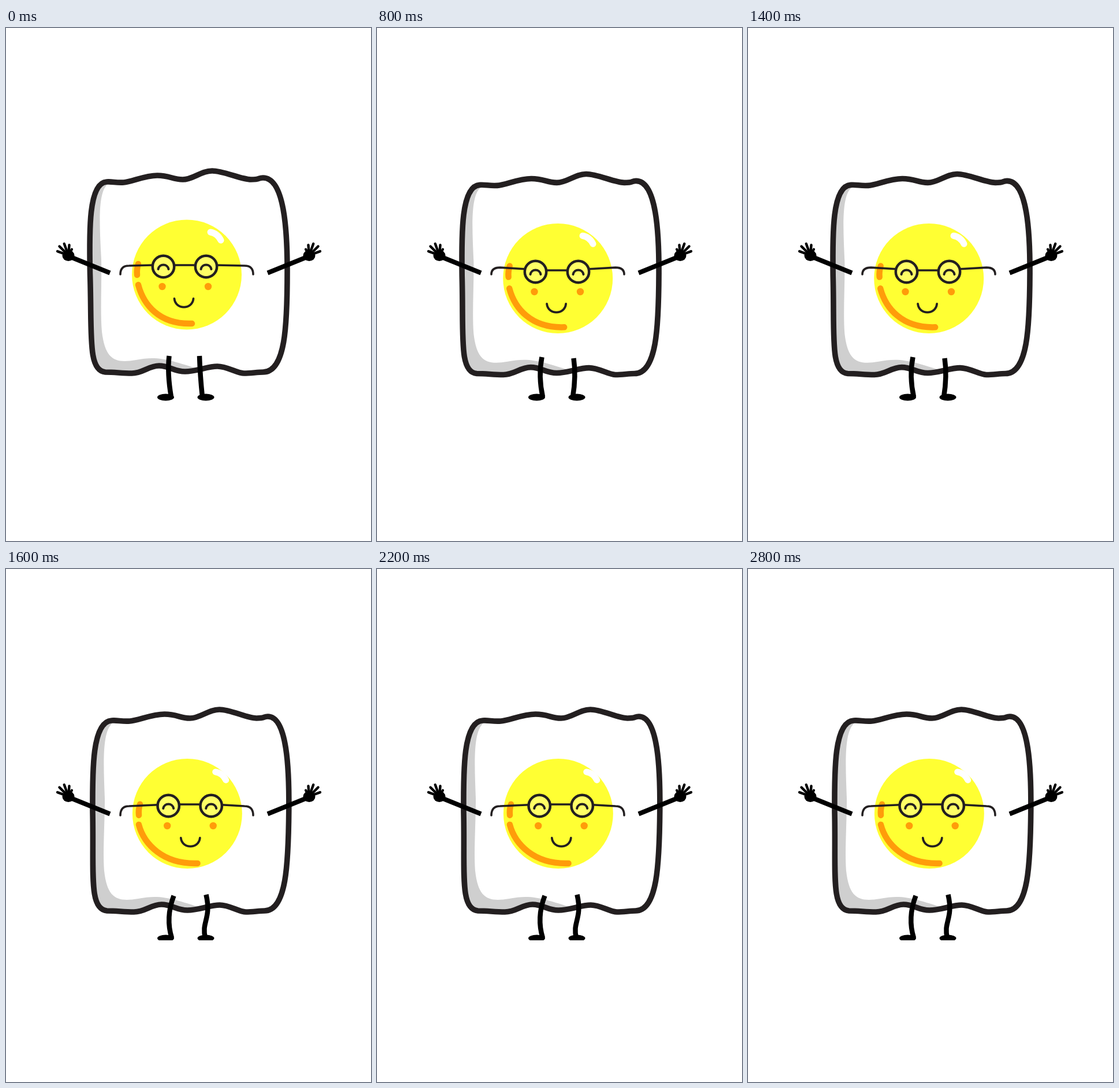
These frames come from a looping animation (632 by 887 pixels, 3 s). An HTML page with a canvas:

```html
<!DOCTYPE html>
<html lang="en">
<head>
<meta charset="utf-8">
<title>Dancing egg</title>
<style>
  html, body { margin: 0; width: 100%; height: 100%; overflow: hidden; background: #fff; }
  canvas { display: block; }
</style>
</head>
<body>
<canvas id="stage" width="632" height="887"></canvas>
<script>
const ctx = document.getElementById('stage').getContext('2d');
const INK = '#231f20', YELLOW = '#ffff33', ORANGE = '#ff9c0a', SHADE = '#cfcfcf';
const POSE_MS = 200;

const OUTLINE = 'M174,266 C184,265 190,268 204,267 S240,255 262,255 S288,262 306,262 S337,247 357,247 ' +
  'S407,262 424,262 S436,259 445,259 C482,259 487,350 487,420 C487,515 484,595 445,595 ' +
  'C435,595 424,597 412,597 S383,585 366,585 S329,594 310,594 S283,584 265,584 S237,597 218,597 ' +
  'S190,595 172,595 C141,592 149,530 145.5,425 C144,350 143,268 174,266 Z';
const SHADOW = 'M178,269 C158,280 162,340 165,400 C166,440 163,490 166,525 C172,575 190,580 225,574 ' +
  'C265,566 285,575 335,590 V615 H130 V255 Z';

// top, bottom and face are offsets from the resting pose.
const poses = [
  { top: [0, 0], bottom: [0, 0], face: [0, 0], yolkY: 426.5, floor: 645,
    legs: 'M282.5 567Q279 597 286 638M335 567Q336 600 340 638' },
  { top: [5.5, 5.5], bottom: [1, 2.5], face: [2, 9], yolkY: 433, floor: 645,
    legs: 'M285.5 569Q279 602 287 638M340.5 571Q345 602 339 638' },
  { top: [13, -4], bottom: [4, -4], face: [8.7, -3], yolkY: 423, floor: 642,
    legs: 'M290.5 565Q276 603 287 638M346.5 563C356 605 338 610 345 638' }
];

// Sways a path between the top and bottom offsets, less towards the sides.
function sway(path, { top, bottom }) {
  return new Path2D(path.replace(/([\d.]+),([\d.]+)/g, (_, px, py) => {
    const x = +px, y = +py;
    const depth = (y - 250) / 350;
    const [dx, dy] = top.map((t, i) => t + (bottom[i] - t) * depth);
    const give = Math.sqrt(Math.sin(Math.PI * (x - 110) / 390));
    return `${x + dx * give},${y + dy}`;
  }));
}

function stroke(path, color, width, cap = 'round') {
  ctx.strokeStyle = color;
  ctx.lineWidth = width;
  ctx.lineCap = cap;
  ctx.lineJoin = 'round';
  ctx.stroke(typeof path === 'string' ? new Path2D(path) : path);
}

function fill(path, color) {
  ctx.fillStyle = color;
  ctx.fill(path);
}

function oval(x, y, rx, ry = rx) {
  const path = new Path2D();
  path.ellipse(x, y, rx, ry, 0, 0, Math.PI * 2);
  return path;
}

function drawBody(pose) {
  const outline = sway(OUTLINE, pose);
  ctx.save();
  ctx.clip(outline);
  fill(sway(SHADOW, pose), SHADE);
  ctx.restore();
  stroke(outline, INK, 9.6);
}

function drawYolk({ face: [dx, dy], yolkY }) {
  fill(oval(313 + dx * 0.1, yolkY, 95), YELLOW);
  stroke(`M${354 + dx} ${353 + dy * 0.7}q12 2 18 14`, '#fff', 11);
  stroke(`M${229 + dx * 0.35} ${408 + dy * 0.4}q-3 9 -2 19`, ORANGE, 10.5);
  stroke(`M${229 + dx * 0.1} ${444 + dy * 0.7}c9 34 ${36 + dx * 0.7} 69 ${93 + dx} 67`, ORANGE, 10.5);
}

function drawFace({ face: [dx, dy] }) {
  for (const x of [272.5 + dx, 346.5 + dx]) {
    const lens = oval(x, 412.5 + dy, 18.7);
    fill(lens, 'rgba(255, 255, 255, 0.25)');
    stroke(lens, INK, 4.5);
    stroke(`M${x - 9} ${417 + dy}c2-10 16-10 18 0`, INK, 4);
  }
  const left = 254 + dx, right = 365 + dx;
  const hinge = 410 + dy * 0.75, bend = 411 + dy * 0.35, bridge = 410 + dy;
  stroke(`M${left} ${hinge}L213 ${bend}Q198 ${bend} 198 426`, INK, 3.6);
  stroke(`M${right} ${hinge}L413 ${bend}Q428 ${bend} 428 426`, INK, 3.6);
  stroke(`M${left + 37} ${bridge}H${right - 37}`, INK, 3.6);

  for (const x of [270.5, 350]) fill(oval(x + dx, 447 + dy, 6.2), ORANGE);
  stroke(`M${291.5 + dx * 1.3} ${468 + dy}c2 19.5 31 19.5 33 0`, INK, 3.8);
}

function drawArm() {
  stroke('M180 423.5L112 396', '#000', 8, 'butt');
  fill(oval(108, 393.5, 10.5, 9.5), '#000');
  for (let i = 0; i < 5; i++) {
    const angle = (200 + 25 * i) * Math.PI / 180;
    const reach = 22 - 1.3 * (i - 1.2) ** 2;
    stroke(`M108 393L${108 + reach * Math.cos(angle)} ${393 + reach * Math.sin(angle)}`, '#000', 4.4);
  }
}

function drawLimbs({ legs, floor }) {
  drawArm();
  ctx.save();
  ctx.translate(633, 0);
  ctx.scale(-1, 1);
  drawArm();
  ctx.restore();

  ctx.save();
  ctx.beginPath();
  ctx.rect(0, 0, 632, floor);
  ctx.clip();
  stroke(legs, '#000', 8.5, 'butt');
  for (const x of [276.5, 346]) fill(oval(x, 638.5, 14.5, 6), '#000');
  ctx.restore();
}

function draw(now) {
  const pose = poses[Math.floor(now / POSE_MS) % poses.length];
  ctx.clearRect(0, 0, 632, 887);
  drawBody(pose);
  drawYolk(pose);
  drawFace(pose);
  drawLimbs(pose);
  requestAnimationFrame(draw);
}
draw(0);
</script>
</body>
</html>
```
